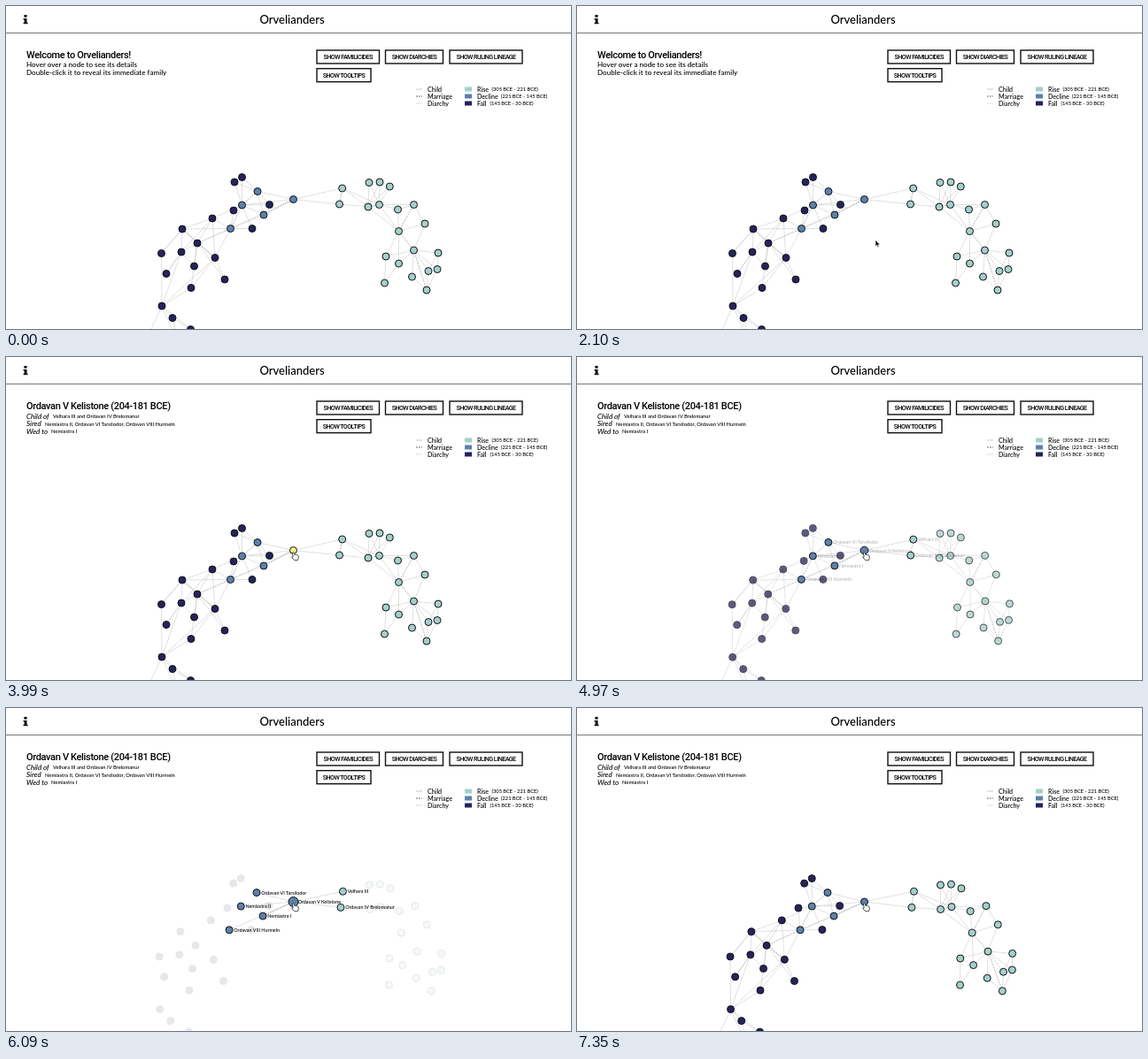
Recreate the animation shown at these times as an HTML page. Size 638 by 365 pixels, loop 7420 ms.

```html
<!DOCTYPE html>
<html lang="en">
<head>
<meta charset="utf-8">
<title>Family graph</title>
<style>
  html, body { margin: 0; width: 100%; height: 100%; overflow: hidden; background: #fff; }
  svg { display: block; width: 638px; height: 365px; }
  text { font-family: Lato, "Open Sans", sans-serif; font-weight: 500; fill: #000; }
  .brand { font-size: 13px; text-anchor: middle; }
  .heading { font: 500 11px Roboto, sans-serif; letter-spacing: -.34px; }
  .body { font-size: 8.1px; }
  .term { font-size: 8px; font-style: italic; }
  .names { font-size: 5.8px; }
  .button { font: 500 7.2px Roboto, sans-serif; letter-spacing: -.58px; text-anchor: middle; }
  .legend { font-size: 7.1px; }
  .years { font-size: 5.7px; }
  .label { font-size: 5.4px; }
</style>
</head>
<body>
<svg id="stage" viewBox="0 0 638 365"></svg>
<script>
const LOOP = 7420, STEP = 70, HOVER = 3430, FOCUS = 4830, RESTORE = 7100;
const COLORS = { fall: '#25235d', decline: '#5c81ad', rise: '#a3d0cc', hover: '#f6f08c' };
const stage = document.getElementById('stage');

function add(tag, attrs, parent = stage, content) {
  const el = document.createElementNS('http://www.w3.org/2000/svg', tag);
  set(el, attrs);
  if (content) el.textContent = content;
  parent.appendChild(el);
  return el;
}
function set(el, attrs) {
  for (const key in attrs) el.setAttribute(key, attrs[key]);
}
const text = (cls, x, y, content, parent) => add('text', { class: cls, x, y }, parent, content);
const clamp = v => Math.max(0, Math.min(1, v));
const ramp = (t, from, to) => clamp((t - from) / (to - from));

// Header
add('path', { d: 'M20.4 10h3.2v2.8h-3.2zM19.6 14h4v4.7h1v1.6h-5v-1.6h1v-3.1h-1z', fill: '#111' });
text('brand', 323, 19.5, 'Orvelianders');
add('path', { d: 'M0 30.5H638', stroke: '#777', 'stroke-width': 1.2 });

// Welcome and details panels
const welcome = add('g', {});
text('heading', 23, 59.2, 'Welcome to Orvelianders!', welcome);
text('body', 23, 69.4, 'Hover over a node to see its details', welcome);
text('body', 23, 78, 'Double-click it to reveal its immediate family', welcome);

const details = add('g', {});
text('heading', 23, 59.2, 'Ordavan V Kelistone (204-181 BCE)', details);
[
  ['Child of', 53, 'Velhara III and Ordavan IV Brelomanur'],
  ['Sired', 44, 'Nemiastra II, Ordavan VI Tarsilodor, Ordavan VIII Hurmeln'],
  ['Wed to', 51, 'Nemiastra I']
].forEach(([term, x, names], i) => {
  text('term', 23, 69.6 + i * 8.5, term, details);
  text('names', x, 69.4 + i * 8.5, names, details);
});

// Buttons
[
  [351, 50, 70.5, 'SHOW FAMILICIDES'],
  [428.5, 50, 65, 'SHOW DIARCHIES'],
  [501, 50, 82, 'SHOW RULING LINEAGE'],
  [351, 70.7, 61, 'SHOW TOOLTIPS']
].forEach(([x, y, width, label]) => {
  add('rect', { x, y, width, height: 15, fill: '#fff', stroke: '#111', 'stroke-width': 1.4 });
  text('button', x + width / 2, y + 10.1, label);
});

// Legend
[
  ['Child', '#bbb', '', 'Rise', 'rise', 548.5, '(305 BCE - 221 BCE)'],
  ['Marriage', '#444', '2 1', 'Decline', 'decline', 559, '(221 BCE - 145 BCE)'],
  ['Diarchy', '#bbb', '1 .6', 'Fall', 'fall', 546.5, '(145 BCE - 30 BCE)']
].forEach(([link, stroke, dash, era, color, x, years], i) => {
  const y = 94 + i * 8;
  add('path', { d: `M463 ${y}h7`, stroke, 'stroke-width': .8, 'stroke-dasharray': dash });
  text('legend', 476, y + 2.5, link);
  add('rect', { x: 518, y: y - 2.5, width: 8, height: 5, fill: COLORS[color] });
  text('legend', 532, y + 2.5, era);
  text('years', x, y + 2.3, years);
});

// Family graph: each node is keyed by one letter
const nodes = {};
function addGroup(era, keys, coords) {
  coords.split(' ').forEach((pair, i) => {
    const [x, y] = pair.split(',').map(Number);
    nodes[keys[i]] = { x, y, era };
  });
}
addGroup('fall', 'abcdefghijklmnopqrst',
  '258,199 266.5,193.5 257,231 297.5,224.5 278,251.5 233,240 199,252 198,278 216,268 175.5,279.5 ' +
  '181,302.5 212.5,294 236,284.5 247,309 209,318.5 176,339 188,352.5 208.5,365.5 158,378 196,385');
addGroup('decline', 'ABCDE', '324.5,218.5 284,209.5 266.5,225 291,236 253.5,251.5');
addGroup('rise', 'FGHIJKLMNOPQRSTUVWXY',
  '379.7,206 376.5,224 410,199.5 422,199 433.3,204 409,227 421.5,224.5 442.5,230 460.5,224.5 473,246 ' +
  '443.5,254.5 460.5,276 488,279 429,283 443.5,291 427.5,313 458.5,306 477,299.5 487,297.5 475,321');

const childLinks = 'AF AG AB AC AE BD CD DE aB aC bB bC dB dC cE cC eE eC fE fC gE gf gi gj gh hi hf hk ' +
  'jg kh li lh mi mE nm ni om oi fi mf ph pj po pm pq pr ps pt qr qt ' +
  'FK FL GK HK HL IK IL JK JL LM KP LP MP MN OP ON LN QO QR QV QW QX SP SQ TP TQ US UT RX RW YW YX YV';
const marriageLinks = 'AD BC CE iE gm FG KL PN PQ QY';
const family = {
  A: 'Ordavan V Kelistone', B: 'Ordavan VI Tarsilodor', C: 'Nemiastra II', D: 'Nemiastra I',
  E: 'Ordavan VIII Hurmeln', F: 'Velhara III', G: 'Ordavan IV Brelomanur'
};

// Where the layout settles once it is nudged by the double-click
function drift(key, { x, y }) {
  if (key === 'A') return [0, .5];
  if (key === 'c') return [-7, -5];
  if (x > 330) return [.5 + (y - 200) * .04, 1.3 - (x - 380) * .027];
  return [-.5 - (324 - x) * .013, Math.max(-.9, -1 + (266 - x) * .027)];
}

const links = [];
function addLinks(list, stroke, width, dash) {
  for (const [from, to] of list.split(' ')) {
    const el = add('line', { stroke, 'stroke-width': width, 'stroke-dasharray': dash });
    links.push({ el, from, to, kept: (from === 'A' || to === 'A') && family[from] && family[to] });
  }
}
addLinks(childLinks, '#b5b5b5', .6, '1.6 .7');
addLinks(marriageLinks, '#999', .7, '2 1');

for (const key in nodes) {
  const node = nodes[key];
  node.drift = drift(key, node);
  node.el = add('circle', { r: 4, fill: COLORS[node.era], stroke: '#111', 'stroke-width': 1 });
}
for (const key in family) nodes[key].label = text('label', 0, 0, family[key]);

// Pointer
const ring = add('circle', { cx: 324.5, cy: 221, fill: 'none', stroke: '#111', 'stroke-width': 1.2 });
const arrow = add('path', {
  d: 'M0 0V7.2L1.7 5.7 2.8 8.3 4 7.8 2.9 5.3H5.2Z', fill: '#111', stroke: '#fff', 'stroke-width': .5
});
const hand = add('path', {
  d: 'M1 .6Q1.8-.2 2.5.8L3.3 3.2 4.3 2.9 5 3.3 6 3.1 6.5 3.7Q7.4 3.6 7.6 4.6L7.8 7 7 9.3H3.2L.4 6.3Q-.2 5.2 1.7 5.7L.9 1.6Z',
  fill: '#fff', stroke: '#222', 'stroke-width': .8, 'stroke-linejoin': 'round'
});

const pointerPath = [
  [490, 352, 372], [770, 346, 323], [980, 345, 306], [1820, 341, 284], [2100, 337, 264.5],
  [2590, 328, 234], [3080, 325, 226], [3430, 324.5, 224], [3850, 322.5, 220.4]
];
function pointerAt(t) {
  const i = pointerPath.findIndex(p => p[0] > t);
  if (i < 0) return pointerPath[pointerPath.length - 1].slice(1);
  if (i === 0) return pointerPath[0].slice(1);
  const a = pointerPath[i - 1], b = pointerPath[i];
  const k = ramp(t, a[0], b[0]);
  return [a[1] + (b[1] - a[1]) * k, a[2] + (b[2] - a[2]) * k];
}

// A double-click precedes each change of focus
const clicks = [FOCUS, RESTORE + 40].flatMap(t => [t - 560, t - 280]);

function render(t) {
  const back = 1 - ramp(t, RESTORE, RESTORE + 210);
  const nodeFade = ramp(t, FOCUS, FOCUS + 490) * back;
  const linkFade = ramp(t, FOCUS, FOCUS + 840) * back;
  const settle = ramp(t, FOCUS, FOCUS + 1120);
  const hovering = t >= HOVER;

  set(welcome, { visibility: hovering ? 'hidden' : 'visible' });
  set(details, { visibility: hovering ? 'visible' : 'hidden' });

  for (const key in nodes) {
    const node = nodes[key];
    node.cx = node.x + node.drift[0] * settle;
    node.cy = node.y + node.drift[1] * settle;
    set(node.el, { cx: node.cx, cy: node.cy, opacity: family[key] ? 1 : 1 - .9 * nodeFade });
    if (node.label) {
      set(node.label, { x: node.cx + 5.2, y: node.cy + 2, opacity: nodeFade });
    }
  }
  set(nodes.A.el, {
    r: 4 + 1.5 * nodeFade,
    fill: hovering && t < FOCUS ? COLORS.hover : COLORS.decline
  });

  for (const { el, from, to, kept } of links) {
    const a = nodes[from], b = nodes[to];
    set(el, { x1: a.cx, y1: a.cy, x2: b.cx, y2: b.cy, opacity: kept ? 1 : 1 - linkFade });
  }

  const [x, y] = pointerAt(t);
  set(arrow, { transform: `translate(${x} ${y})`, visibility: hovering ? 'hidden' : 'visible' });
  set(hand, { transform: `translate(${x} ${y})`, visibility: hovering ? 'visible' : 'hidden' });

  const click = clicks.find(start => t >= start && t < start + 210);
  set(ring, {
    visibility: click === undefined ? 'hidden' : 'visible',
    r: click === undefined ? 0 : 6 + 10.5 * ramp(t, click, click + 140)
  });
}

const start = performance.now();
function tick() {
  const t = (performance.now() - start) % LOOP;
  render(Math.floor(t / STEP) * STEP);
  requestAnimationFrame(tick);
}
tick();
</script>
</body>
</html>
```
